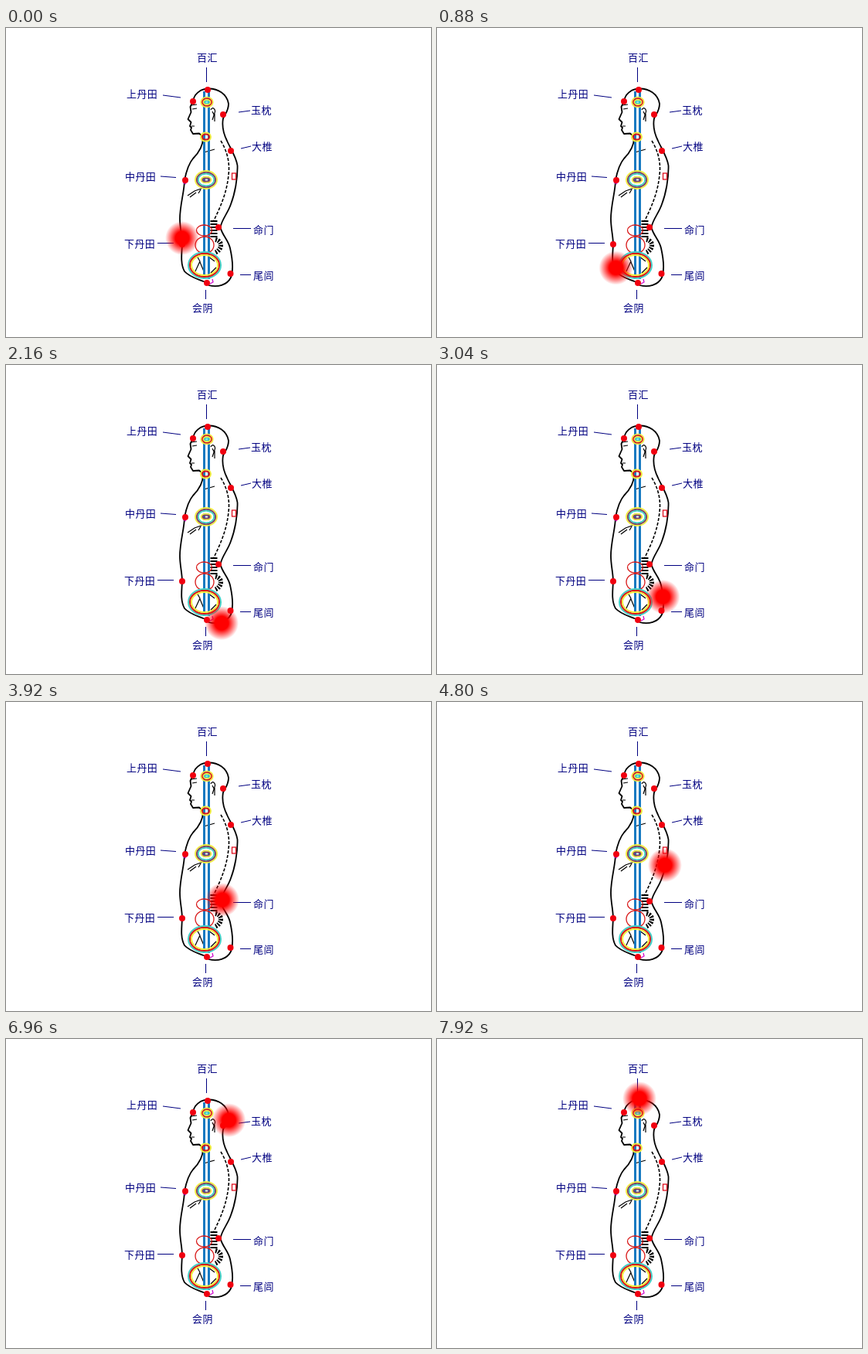
Animation, 550 px wide and 400 px high, one loop 8000 ms. Source, as an HTML page:

```html
<!DOCTYPE html>
<html lang="zh-CN">
<head>
<meta charset="utf-8">
<style>
html, body { margin: 0; width: 100%; height: 100%; overflow: hidden; background: #fff; }
svg { display: block; }
text { font: 13px "Noto Sans CJK SC", "Noto Sans CJK", sans-serif; letter-spacing: .4px; fill: #000080; }
</style>
</head>
<body>
<svg width="550" height="400" viewBox="0 0 550 400" fill="none">
  <defs>
    <radialGradient id="fade">
      <stop offset=".4" stop-color="red"/>
      <stop offset="1" stop-color="red" stop-opacity="0"/>
    </radialGradient>
  </defs>

  <!-- body outline -->
  <g stroke="#000" stroke-width="1.8" stroke-linejoin="round">
    <path d="M242 95C243 86 251 79 261 78.500C275 78 286 86 288 98C288 107 284 111 281 117C279 128 281 136 286 146C290 155 298 167 299.500 178C300 195 296 215 291 228C287 240 279 248 277.500 258C279 267 288 275 290 285C294 303 294 315 291 323C286 333 274 336 262 333"/>
    <path d="M242 95L238.500 102L239.500 109L235.500 118L239.500 122L238 127L240 129L239 132L242 137L250 136.500L254 140"/>
    <path d="M255 142C255 152 249 162 242 169C236 176 233 187 231 197C231 211 225 229 225 247C225 260 228 269 228 281C227 295 226 306 231 315C238 323 249 325 258 329"/>
  </g>
  <!-- face, ear, chest, spine and pelvis -->
  <g stroke="#000" stroke-width="1.2">
    <path d="M240 100L247 99M241 105L247 104M240 127H244M265 106C267 101 272 105 270 110L267 119M267 108L269 112M270 111V121"/>
    <path d="M256 161L270 157M235 217L244 211L255 207M238 219L246 213M249 214L252 209"/>
    <path d="M278 146C286 159 290 174 288 190C286 211 279 229 269 249" stroke-width="1.6" stroke-dasharray="4 2"/>
    <path d="M269 249V272" stroke-width="9" stroke-dasharray="2 2"/>
    <path d="M271 274C281 276 280 287 270 291" stroke-width="6" stroke-dasharray="2 1.5"/>
    <path d="M244 317L251 302L247 295M251 303L256 315M262 296L270 302M265 317L272 310"/>
  </g>

  <path d="M256.500 82V325M262.500 82V325" stroke="#1579c1" stroke-width="3"/>
  <g id="rings"></g>
  <rect x="292.500" y="188" width="5" height="8" stroke="#e01020" stroke-width="1.3"/>
  <path d="M264 331L268 329L267 325M229 200L233 202" stroke="#c0c" stroke-width="1.2"/>
  <path d="M261 80h0M242 95h0M281 112h0M291 159h0M232 197h0M228 280h0M275 258h0M290.500 318h0M260 330h0" stroke="#f00010" stroke-width="8" stroke-linecap="round"/>

  <path d="M259.500 51V70M203 87L226 90M301 109L316 107M304 156L317 153M200 192L220 193.500M196 278.500H217M294 259.500H317M303 319.500H317M258.500 339V351" stroke="#000080"/>
  <text x="247" y="43">百汇</text>
  <text x="156" y="90">上丹田</text>
  <text x="317" y="111">玉枕</text>
  <text x="318" y="158">大椎</text>
  <text x="154" y="197">中丹田</text>
  <text x="153" y="284">下丹田</text>
  <text x="320" y="266">命门</text>
  <text x="320" y="325">尾闾</text>
  <text x="241" y="367">会阴</text>
  <circle id="glow" r="22" fill="url(#fade)"/>
</svg>
<script>
const RED = '#d81818', YELLOW = '#f2ed3c', CYAN = '#40d0c8', PLUM = '#804060';
const $ = id => document.getElementById(id);

// Concentric ellipses, one per colour, each a pen width further in
function rings(x, y, rx, ry, pen, ...colors) {
  $('rings').innerHTML += colors.map((c, i) =>
    `<ellipse cx="${x}" cy="${y}" rx="${rx - i * pen}" ry="${ry - i * pen}" stroke="${c}" stroke-width="${pen}"/>`).join('');
}
rings(260, 96, 7.8, 6.5, 1.7, YELLOW, RED, YELLOW, CYAN);
rings(258.5, 141, 6.5, 5.5, 2, YELLOW, RED);
rings(259, 196.5, 14, 11.5, 1.9, YELLOW, PLUM, CYAN, '#fff', YELLOW, PLUM);
rings(256.5, 262, 10, 7, 1.3, RED);
rings(257, 281, 12, 11, 1.3, RED);
rings(257, 307, 21, 17, 2, CYAN, RED, YELLOW);

// Orbit points, evenly spaced in time and joined by a smooth curve
const LOOP = 8000, STEP = 80, LEG = 440;
const orbit = [
  [228, 272], [228, 291], [231.5, 310.5], [244, 326], [262, 335], [280.5, 333.5], [293.5, 319],
  [292, 298], [285, 277], [280, 254], [287.5, 232], [295.5, 209], [299.5, 184], [294, 162],
  [284, 141], [281.5, 120], [289, 102], [282, 86], [262, 77]
];
const point = i => orbit[Math.max(0, Math.min(i, orbit.length - 1))];

function place(t) {
  const i = Math.floor(t / LEG), u = t / LEG - i;
  const [a, b, c, d] = [-1, 0, 1, 2].map(k => point(i + k));
  return [0, 1].map(k => b[k] + u / 2 * (c[k] - a[k]
    + u * (2 * a[k] - 5 * b[k] + 4 * c[k] - d[k] + u * (3 * (b[k] - c[k]) + d[k] - a[k]))));
}

function draw() {
  const t = Math.floor(performance.now() % LOOP / STEP) * STEP;
  const [x, y] = place(t);
  $('glow').setAttribute('cx', x);
  $('glow').setAttribute('cy', y);
  requestAnimationFrame(draw);
}
draw();
</script>
</body>
</html>
```
